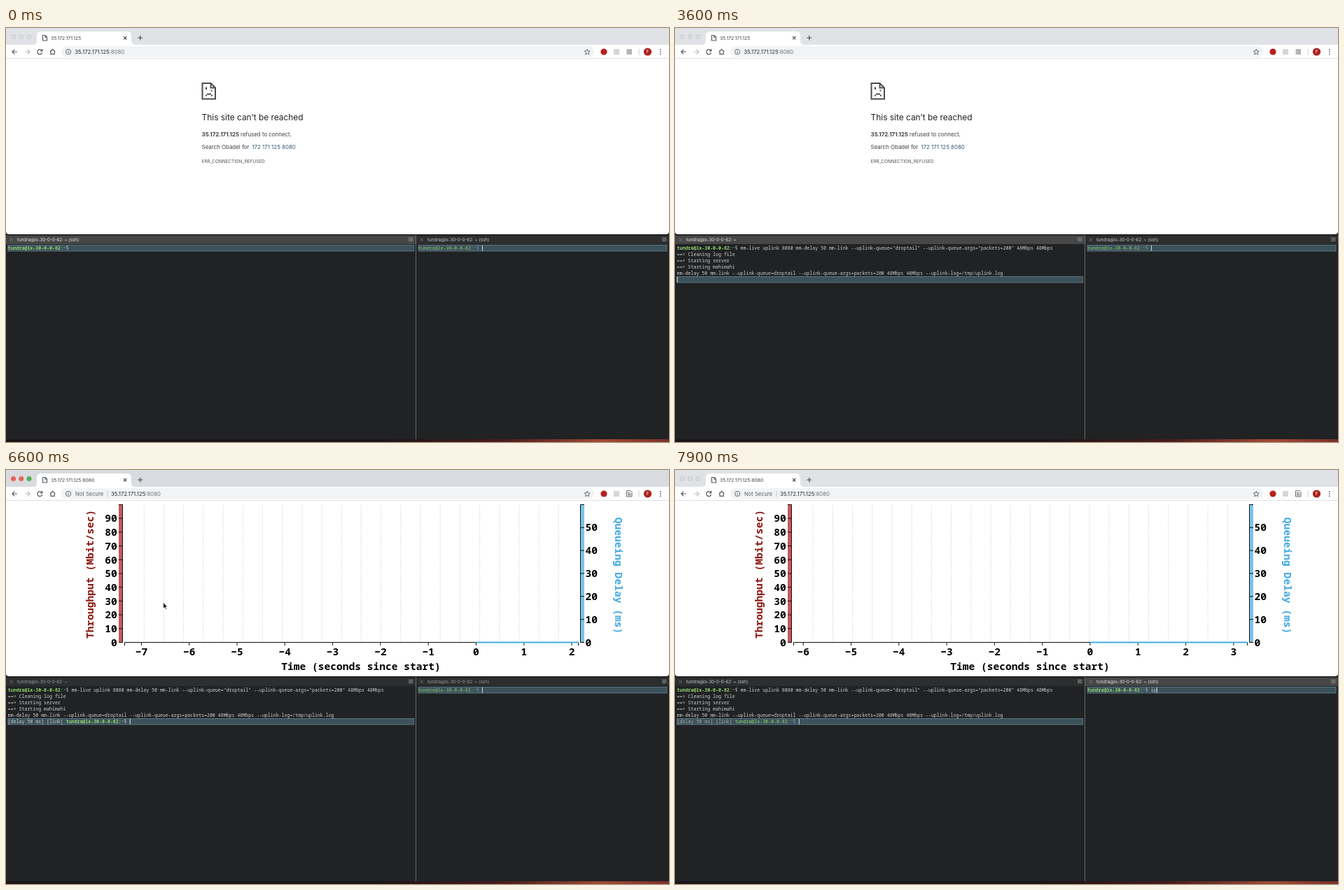
Animation of 947 by 592 pixels, one loop 8 s. Source, as an HTML page:

```html
<!DOCTYPE html>
<html lang="en">
<head>
<meta charset="utf-8">
<title>Live link monitor</title>
<style>
html, body { margin: 0; width: 100%; height: 100%; overflow: hidden; background: #111; }
svg { display: block; width: 947px; height: 592px; }
text { font-family: Inter, Roboto, sans-serif; white-space: pre; }
.term text { font: 6.59px "Noto Sans Mono", monospace; fill: #cdcfcf; }
.term .user { font-weight: 700; fill: #90d56c; }
.term .path { fill: #a6bfb4; }
.band { fill: #3c515a; stroke: #648591; stroke-width: .8; }
.caret { fill: #e4e8e8; }
.bar text { font-size: 6.2px; }
.chart text { font: 700 14.6px "Noto Sans Mono", monospace; }
.line { fill: none; stroke: #555a5f; stroke-width: 1.2; }
.axis { fill: none; stroke: #111; }
.body { font-size: 7.9px; fill: #3c4043; }
</style>
</head>
<body>
<svg viewBox="0 0 947 592">
  <defs>
    <linearGradient id="desk">
      <stop offset=".55" stop-color="#1b1416"/><stop offset=".75" stop-color="#4a1c1c"/>
      <stop offset=".9" stop-color="#a34a35"/><stop offset="1" stop-color="#7a3028"/>
    </linearGradient>
  </defs>

  <!-- browser -->
  <path d="M0 0H947V291a4 4 0 0 1-4 4H4a4 4 0 0 1-4-4Z" fill="#fff"/>
  <rect id="strip" width="947" height="24"/>
  <path d="M38 24Q44 24 44 18V11Q44 5 50 5H173Q179 5 179 11V18Q179 24 185 24Z" fill="#fff"/>
  <g id="lights" stroke-width=".7"></g>
  <path class="line" stroke-width="1" d="M52.5 10.5H56L58.5 13V18H52.5ZM56 10.5V13H58.5"/>
  <text id="tab" x="64" y="16.6" font-size="6.8" fill="#3c4043"></text>
  <path class="line" d="M168 12l4.4 4.4M172.4 12L168 16.4M188.3 14.2H195M191.7 10.8V17.6"/>
  <path d="M0 43.5H947" stroke="#dfe1e4"/>
  <rect x="79" y="26" width="761" height="15.5" rx="7.7" fill="#f1f3f4"/>
  <path class="line" d="M16 34H9M12.3 30.6L8.9 34L12.3 37.4M51.2 32A3.5 3.5 0 1 0 51.7 35.3M51.8 30V32.8H49M63 34L66.6 30.4L70.2 34M64 33.6V37.4H69.2V33.6"/>
  <path class="line" style="stroke:#b9bcbf" d="M27 34H34M30.7 30.6L34.1 34L30.7 37.4"/>
  <path class="line" style="stroke-width:.9" d="M92.7 34a3.6 3.6 0 1 0-7.2 0a3.6 3.6 0 1 0 7.2 0M89.1 33.4V36M89.1 31.7V32.5M830.2 30.2l1.1 2.7 2.9.2-2.2 1.9.7 2.8-2.5-1.5-2.5 1.5.7-2.8-2.2-1.9 2.9-.2Z"/>
  <g id="secure">
    <text x="99" y="36.7" font-size="7.6" fill="#5f6368">Not Secure</text>
    <path d="M145 29.5V38.5" stroke="#c4c7ca"/>
  </g>
  <text id="url" y="36.8" font-size="7.75" fill="#26282b">35.172.171.125<tspan fill="#6d7175">:8080</tspan></text>
  <circle cx="854" cy="34" r="4.6" fill="#b7201f"/>
  <rect x="868" y="30" width="8" height="8" fill="#d4d6d8"/>
  <rect id="ext" x="886.5" y="30" width="7.5" height="8" fill="#b4b6b8"/>
  <path id="doc" class="line" style="stroke-width:.9" d="M886.5 29.7H892L894 31.7V38H886.5ZM888 32.5H891M888 34.3H892.6M888 36H892.6"/>
  <path d="M904 29.5V38.5" stroke="#cfd1d4"/>
  <circle cx="916.5" cy="34" r="5.6" fill="#ab211d"/>
  <text x="916.5" y="36.3" font-size="6.3" fill="#fff" text-anchor="middle">F</text>
  <path d="M934 30h1.6v1.6h-1.6ZM934 33.2h1.6v1.6h-1.6ZM934 36.4h1.6v1.6h-1.6Z" fill="#55595d"/>

  <!-- error page -->
  <g id="error">
    <path d="M280.5 79H292.5L299 85.5V101.5H280.5ZM292.5 79V85.5H299" fill="none" stroke="#4c4c4c" stroke-width="2"/>
    <path d="M285 84.5h2v3.5h-2ZM292.5 88.5h2v2h-2ZM287 93.5h6v2h-6ZM285 95.5h2v2h-2ZM293 95.5h2v2h-2Z" fill="#4c4c4c"/>
    <text x="279.6" y="132.4" font-size="11.9" fill="#202124">This site can’t be reached</text>
    <text class="body" x="279.6" y="154.6"><tspan font-weight="700">35.172.171.125</tspan> refused to connect.</text>
    <text class="body" x="279.6" y="172.5">Search Obadel for</text>
    <text class="body" x="351.3" y="172.5" style="fill:#2f566c">172 171 125 8080</text>
    <text x="279.6" y="193.3" font-size="6.4" fill="#505357">ERR_CONNECTION_REFUSED</text>
  </g>

  <!-- live chart -->
  <g class="chart" id="chart">
    <path id="grid" stroke="#dcdcdc" stroke-dasharray="2 1.4"/>
    <path class="axis" style="fill:#c55a5a" d="M161 49.5H166.5V246.5H161"/>
    <path class="axis" style="fill:#7cc3ea" d="M826 49.5H820.5V246.5H826"/>
    <g id="scales"></g>
    <path class="axis" d="M169.5 251V246.5H817.5V251"/>
    <g id="ticks"></g>
    <path id="delay" stroke="#43aee8" stroke-width="2"/>
    <text transform="translate(124.5 149) rotate(-90)" text-anchor="middle" fill="#8a1811">Throughput (Mbit/sec)</text>
    <text transform="translate(869.5 151) rotate(90)" text-anchor="middle" fill="#41a9e4">Queueing Delay (ms)</text>
    <text x="507" y="286" text-anchor="middle">Time (seconds since start)</text>
  </g>

  <!-- terminals -->
  <rect y="296" width="947" height="292" fill="#202224"/>
  <rect y="588" width="947" height="4" fill="url(#desk)"/>
  <g class="bar" id="barL"></g>
  <g class="bar" id="barR"></g>
  <path d="M585.5 296V588" stroke="#65686a"/>
  <g class="term" id="left"></g>
  <g class="term" id="right"></g>

  <path id="mouse" d="M0 0V8.6L2 6.8L3.4 9.8L4.8 9.2L3.5 6.2H6.2Z" fill="#111" stroke="#fff" stroke-width=".7"/>
</svg>
<script>
const $ = id => document.getElementById(id);
const LOOP = 8000, CHAR = 6.59 * .6;
const PASTE = 800, ENTER = 3600, READY = 4100, BROWSER = 4900, LOAD = 5800, RIGHT = 7400;
const HOST = 'tundra@lx-30-0-0-62';
const PROMPT = `<tspan class="user">${HOST}</tspan>:<tspan class="path">~$</tspan> `;
const PROMPT_LEN = HOST.length + 4;
const COMMAND = 'mm-live uplink 8080 mm-delay 50 mm-link --uplink-queue="droptail" --uplink-queue-args="packets=200" 48Mbps 48Mbps';
const OUTPUT = [
  '==&gt; Cleaning log file', '==&gt; Starting server', '==&gt; Starting mahimahi',
  'mm-delay 50 mm-link --uplink-queue=droptail --uplink-queue-args=packets=200 48Mbps 48Mbps --uplink-log=/tmp/uplink.log'
];

const show = (id, on) => $(id).setAttribute('visibility', on ? 'visible' : 'hidden');
const label = (x, y, s, anchor) => `<text x="${x}" y="${y}" text-anchor="${anchor}">${s}</text>`;

function buildChart() {
  let grid = '', scales = '';
  for (let i = 0; i < 22; i++) grid += `M${(197.2 + i * 28.2).toFixed(1)} 50V246`;
  $('grid').setAttribute('d', grid);
  for (let v = 0; v < 100; v += 10) {
    const y = 246.5 - v * 1.97;
    scales += `<path class="axis" d="M161 ${y}H166.5"/>` + label(158.7, y + 5.2, v, 'end');
  }
  for (let v = 0; v < 60; v += 10) {
    const y = 246.5 - v * 3.285;
    scales += `<path class="axis" d="M820.5 ${y}H826"/>` + label(827.6, y + 5.2, v, 'start');
  }
  $('scales').innerHTML = scales;
}

function drawTime(t) {
  const zero = 671.5 - (t - 6600) * .0604;
  let ticks = '';
  for (let s = -9; s < 5; s++) {
    const x = zero + s * 68.3;
    if (x < 169.5 || x > 817.5) continue;
    ticks += `<path class="axis" d="M${x} 246.5V251"/>` + label(x, 264.5, s < 0 ? '−' + -s : s, 'middle');
  }
  $('ticks').innerHTML = ticks;
  $('delay').setAttribute('d', `M${zero} 246.5H817.5`);
}

function drawBar(id, x, w, title, active, dim) {
  const color = active ? '#e6e6e6' : dim ? '#9c9c9c' : '#c9c9c9', end = x + w;
  $(id).innerHTML = `<rect x="${x}" y="296.5" width="${w}" height="12.5" fill="${active ? '#474747' : '#2d2e2f'}"/>
    <path d="M${x + 5.5} 300.5l4.5 4.5m0-4.5l-4.5 4.5" stroke="#7d7d7d" stroke-width=".8"/>
    <text x="${x + 16}" y="305.1" fill="${color}">${title}</text>
    <path d="M${end - 10} 300.3h6.5m-6.5 2h6.5m-6.5 2h6.5" stroke="#999" stroke-width=".9"/>`;
}

function drawTerm(id, x, w, lines, chars, caret, dim) {
  const row = lines.length - 1, y = 310.4 + row * 9;
  $(id).innerHTML = `<rect class="band" x="${x}" y="${y}" width="${w}" height="8.6"/>` +
    lines.map((s, i) => `<text x="${x}" y="${317.2 + i * 9}" opacity="${dim && i === row ? dim : 1}">${s}</text>`).join('') +
    (caret ? `<rect class="caret" x="${x + chars * CHAR}" y="${y + .3}" width=".9" height="8"/>` : '');
}

function drawMouse(t) {
  const stops = [[4600, 260, 400], [5000, 224.6, 189.5], [6750, 224.6, 189.5], [7150, 780.6, 431.5], [7700, 780.6, 431.5]];
  const i = stops.findIndex(s => t < s[0]);
  show('mouse', i > 0);
  if (i < 1) return;
  const [a, ax, ay] = stops[i - 1], [b, bx, by] = stops[i];
  const k = (t - a) / (b - a), e = k * k * (3 - 2 * k);
  $('mouse').setAttribute('transform', `translate(${ax + (bx - ax) * e} ${ay + (by - ay) * e})`);
}

function draw(t) {
  const inBrowser = t >= BROWSER && t < RIGHT, inLeft = t < BROWSER, inRight = t >= RIGHT;
  const loaded = t >= LOAD;

  $('strip').setAttribute('fill', inBrowser ? '#d8dbdf' : '#e0e2e5');
  const colors = inBrowser ? ['#e9605a', '#e9645b', '#4fae55'] : Array(3).fill('#d9dbdd');
  $('lights').innerHTML = colors.map((c, i) =>
    `<circle cx="${10.6 + i * 11.2}" cy="12.5" r="3.2" fill="${c}" stroke="${inBrowser ? c : '#c6c8ca'}"/>`).join('');
  $('tab').textContent = '35.172.171.125' + (loaded ? ':8080' : '');
  $('url').setAttribute('x', loaded ? 150 : 98.3);
  for (const id of ['secure', 'doc', 'chart']) show(id, loaded);
  for (const id of ['ext', 'error']) show(id, !loaded);
  if (loaded) drawTime(t);

  const ssh = HOST + ': ~ (ssh)';
  drawBar('barL', 0, 585, t < PASTE || inRight ? ssh : HOST + ': ~', inLeft, inBrowser);
  drawBar('barR', 586, 361, ssh, inRight, inBrowser);

  const lines = [PROMPT + (t < PASTE ? '' : COMMAND)];
  let chars = PROMPT_LEN + (t < PASTE ? 0 : COMMAND.length);
  if (t >= ENTER) {
    const ready = t >= READY, lead = '[delay 50 ms] [link] ';
    lines.push(...OUTPUT, ready ? lead + PROMPT : '');
    chars = ready ? lead.length + PROMPT_LEN : 0;
  }
  const blink = t % 1000 >= 200 && t % 1000 < 700;
  drawTerm('left', 2.8, 580, lines, chars, !inLeft || blink, inRight ? .7 : 0);

  const typed = 'ip'.slice(0, t < 7700 ? 0 : t < 7800 ? 1 : 2);
  drawTerm('right', 589, 355, [PROMPT + typed], PROMPT_LEN + typed.length, true, inRight ? 0 : .62);
  drawMouse(t);
}

buildChart();
const start = performance.now();
(function frame() {
  draw(Math.floor((performance.now() - start) % LOOP / 100) * 100);
  requestAnimationFrame(frame);
})();
</script>
</body>
</html>
```
